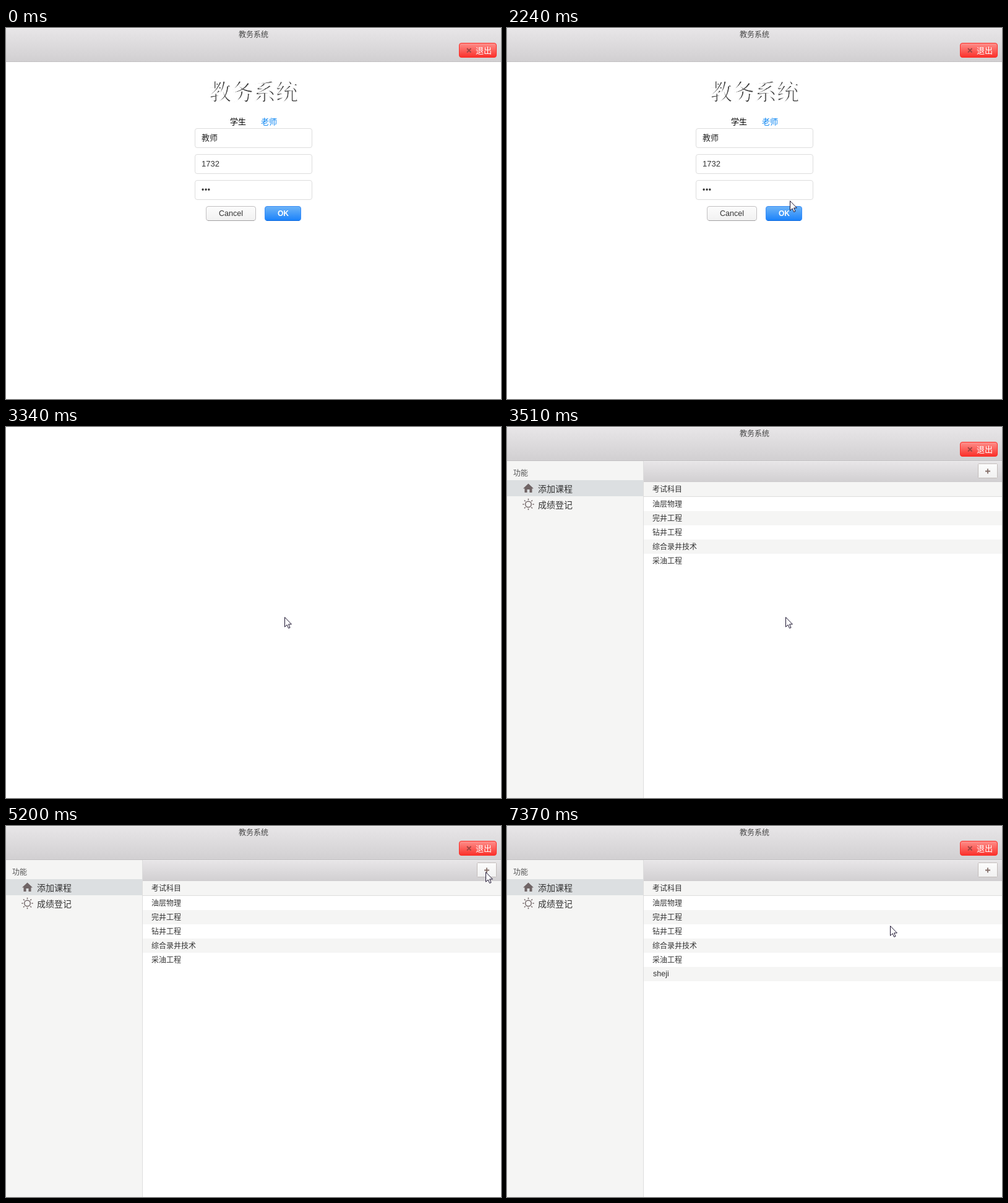
Animation of 800x600 px, one loop 8000 ms. Source, as an HTML page:

```html
<!DOCTYPE html>
<html lang="zh-CN">
<head>
<meta charset="utf-8">
<style>
  html, body { margin: 0; width: 100%; height: 100%; overflow: hidden; background: #fff; }
  svg { display: block; }
  text { font: 12px "Liberation Sans", "Noto Sans CJK SC", "Noto Sans CJK", sans-serif; fill: #333; white-space: pre; }
  .mid { font-size: 13px; }
  .big { font-size: 14px; }
  .latin { font-size: 12.5px; }
  /* The white outline thins the strokes of the heading. */
  .title { font-family: "Noto Serif CJK SC", "Noto Sans CJK SC", "Noto Sans CJK", serif; font-size: 36px; font-weight: 200; stroke: #fff; stroke-width: 1; }
  .dots { font-size: 12px; letter-spacing: .7px; }
  .field { fill: #fff; stroke: #ddd; }
  .icon { fill: none; stroke: #75696a; stroke-width: 1.5; }
</style>
</head>
<body>
<svg width="800" height="600" viewBox="0 0 800 600">
  <defs>
    <linearGradient id="bar" x2="0" y2="1"><stop stop-color="#e8e6e8"/><stop offset="1" stop-color="#d1cfd1"/></linearGradient>
    <linearGradient id="red" x2="0" y2="1"><stop stop-color="#fd918d"/><stop offset="1" stop-color="#fb2f29"/></linearGradient>
    <linearGradient id="blue" x2="0" y2="1"><stop stop-color="#6eb4f7"/><stop offset="1" stop-color="#1a82fb"/></linearGradient>
    <linearGradient id="pressed" x2="0" y2="1"><stop stop-color="#3e9bf4"/><stop offset="1" stop-color="#0469de"/></linearGradient>
    <linearGradient id="grey" x2="0" y2="1"><stop stop-color="#fcfcfc"/><stop offset="1" stop-color="#f1f1f1"/></linearGradient>
  </defs>

  <g id="header">
    <rect width="800" height="55" fill="url(#bar)"/>
    <path d="M0 .5H800" stroke="#f5f4f5"/>
    <path d="M0 54.5H800" stroke="#c2c0c2"/>
    <text x="376" y="14.5" style="fill:#444">教务系统</text>
    <rect x="732.5" y="24.5" width="60" height="23" rx="3.5" fill="url(#red)" stroke="#fb2f29"/>
    <path d="M745 33l6.5 6.5m0-6.5l-6.5 6.5" stroke="#a04442" stroke-width="1.8"/>
    <text class="mid" x="759" y="40.5" style="fill:#fff">退出</text>
  </g>

  <g id="login">
    <text class="title" x="328" y="117">教务系统</text>
    <text class="mid" id="studentTab" x="362" y="156">学生</text>
    <text class="mid" id="teacherTab" x="412" y="156">老师</text>
    <rect class="field" x="305.5" y="162.5" width="189" height="31" rx="3.5"/>
    <rect class="field" x="305.5" y="204.5" width="189" height="31" rx="3.5"/>
    <rect class="field" x="305.5" y="246.5" width="189" height="31" rx="3.5"/>
    <rect id="ring" x="303.5" y="202.5" width="193" height="35" rx="4.5" fill="none" stroke="#6db3fd" stroke-width="3"/>
    <text class="mid" id="role" x="316" y="182"></text>
    <text class="mid" id="account" x="316" y="224"></text>
    <text id="password" x="316" y="266"></text>
    <rect x="323.5" y="288.5" width="80" height="23" rx="3.5" fill="url(#grey)" stroke="#c2c0c2"/>
    <path d="M326 311.5h75" stroke="#a19fa1"/>
    <text class="latin" x="344" y="304">Cancel</text>
    <rect id="ok" x="418.5" y="288.5" width="58" height="23" rx="3.5" stroke="#388df8"/>
    <path d="M421 311.5h53" stroke="#0866dc"/>
    <text x="439" y="304" style="fill:#fff;font-weight:bold">OK</text>
  </g>

  <g id="main">
    <rect y="55" width="220" height="545" fill="#f5f5f4"/>
    <path d="M220.5 55V600" stroke="#ddd"/>
    <text x="10" y="78.5" style="fill:#555">功能</text>
    <rect y="86" width="220" height="26" fill="#dcdfe1"/>
    <path d="M26 99.5L34.5 91.5 43 99.5H40.5V106H36.5V101H32.5V106H28.5V99.5Z" fill="#6f6465"/>
    <text class="big" x="50" y="104.5">添加课程</text>
    <circle class="icon" cx="34.5" cy="125" r="4.8"/>
    <g id="rays" class="icon"></g>
    <text class="big" x="50" y="130.5">成绩登记</text>
    <rect x="221" y="55" width="579" height="34" fill="url(#bar)"/>
    <path d="M221 55.5H800" stroke="#f0eff0"/>
    <path d="M221 88.5H800" stroke="#cfcdcf"/>
    <rect x="761.5" y="59.5" width="31" height="23" rx="1" fill="url(#grey)" stroke="#c2bcba"/>
    <path d="M773 71.5h8m-4-4v8" stroke="#85706a" stroke-width="1.8"/>
    <rect x="221" y="89" width="579" height="23" fill="#f5f5f4"/>
    <path d="M221 112.5H800" stroke="#ddd"/>
    <text x="235" y="104.5">考试科目</text>
    <g id="rows"></g>
    <g id="newRow">
      <rect x="221" y="228" width="579" height="23" fill="#f5f5f4"/>
      <rect id="editBox" x="221.75" y="227.75" width="577.5" height="23" fill="none" stroke="#efc16c" stroke-width="1.5"/>
      <text class="latin" id="typed" x="236" y="243"></text>
      <rect id="caret" y="232" width="1" height="14" fill="#222"/>
    </g>
  </g>

  <path id="cursor" d="M.5 .7V16.3L4.1 12.9 6.6 18.4 9 17.5 6.6 12H11.4Z" fill="#fff" stroke="#1c1430"/>
</svg>
<script>
const LOOP = 8000, BLINK = 455;
const $ = id => document.getElementById(id);
const show = (id, on) => $(id).style.display = on ? '' : 'none';
const write = (id, text, color) => { $(id).textContent = text; $(id).style.fill = color; };

// Pointer strokes: first and last step time, then one x, y pair per step.
const strokes = [
  [120, 760, 653,492, 608,446, 560,395, 513,330, 470,270, 432,218, 402,180, 385,159, 379,152],
  [1230, 1460, 395,150, 415,147, 430,148, 436,151],
  [2090, 2470, 438,163, 448,230, 457,279, 459,292, 455,297, 451,295],
  [3340, 3340, 450,307],
  [3810, 4580, 400,270, 310,215, 220,170, 165,145, 157,135, 170,130, 260,125, 370,119, 470,113, 554,114, 593,119],
  [4660, 4660, 598,122],
  [4810, 5270, 615,118, 660,105, 710,92, 745,83, 765,77, 775,74, 776,74],
  [5440, 5900, 776,74, 740,95, 660,150, 570,200, 497,226, 478,253, 490,241],
  [7370, 7370, 619,161],
];
const typing = [[5440, ''], [5825, 'w'], [6510, ''], [6670, 's'], [6820, 'sh'],
  [6970, 'she'], [7050, 'shej'], [7220, 'sheji']];

const latest = (list, t) => list.filter(item => item[0] <= t).pop();

$('rows').innerHTML = ['油层物理', '完井工程', '钻井工程', '综合录井技术', '采油工程'].map((name, i) =>
  `<rect x="221" y="${113 + 23 * i}" width="579" height="23" fill="${i % 2 ? '#f5f5f4' : '#fff'}"/>
   <text x="235" y="${128.5 + 23 * i}">${name}</text>`).join('');
$('rays').innerHTML = Array.from({ length: 8 }, (_, i) =>
  `<path d="M34.5 118.2v-2.4" transform="rotate(${45 * i} 34.5 125)"/>`).join('');

function drawCursor(t) {
  const stroke = latest(strokes, t);
  show('cursor', stroke);
  if (!stroke) return;
  const [start, end, ...points] = stroke;
  const last = points.length / 2 - 1;
  const step = t >= end ? last : Math.floor((t - start) / (end - start) * last + 0.05);
  $('cursor').setAttribute('transform', `translate(${points[2 * step]} ${points[2 * step + 1]})`);
}

function drawLogin(t) {
  const student = t >= 1080 && t < 1740;
  const ink = student ? '#a9a9a9' : '#333';
  $('studentTab').style.fill = student ? '#0c86f2' : '#000';
  $('teacherTab').style.fill = student ? '#000' : '#0c86f2';
  write('role', student ? '学生' : '教师', '#222');
  write('account', student ? '学号' : '1732', ink);
  write('password', student ? '密码' : '•••', ink);
  $('password').setAttribute('class', student ? 'mid' : 'dots');
  show('ring', t >= 2700);
  $('ok').setAttribute('fill', t >= 2620 && t < 2770 ? 'url(#pressed)' : 'url(#blue)');
}

function drawNewRow(t) {
  const entry = latest(typing, t);
  show('newRow', entry);
  if (!entry) return;
  const editing = t < 7370;
  write('typed', entry[1], '#333');
  show('editBox', editing);
  show('caret', editing && (t - entry[0]) % (2 * BLINK) < BLINK);
  const width = entry[1] ? $('typed').getComputedTextLength() : 0;
  $('caret').setAttribute('x', 236 + Math.round(width));
}

function draw(now) {
  const t = now % LOOP;
  show('header', t < 3110 || t >= 3425);
  show('login', t < 3110);
  show('main', t >= 3425);
  show('rows', t >= 3510);
  drawLogin(t);
  drawNewRow(t);
  drawCursor(t);
}

const began = performance.now();
function tick() {
  draw(performance.now() - began);
  requestAnimationFrame(tick);
}
tick();
</script>
</body>
</html>
```
